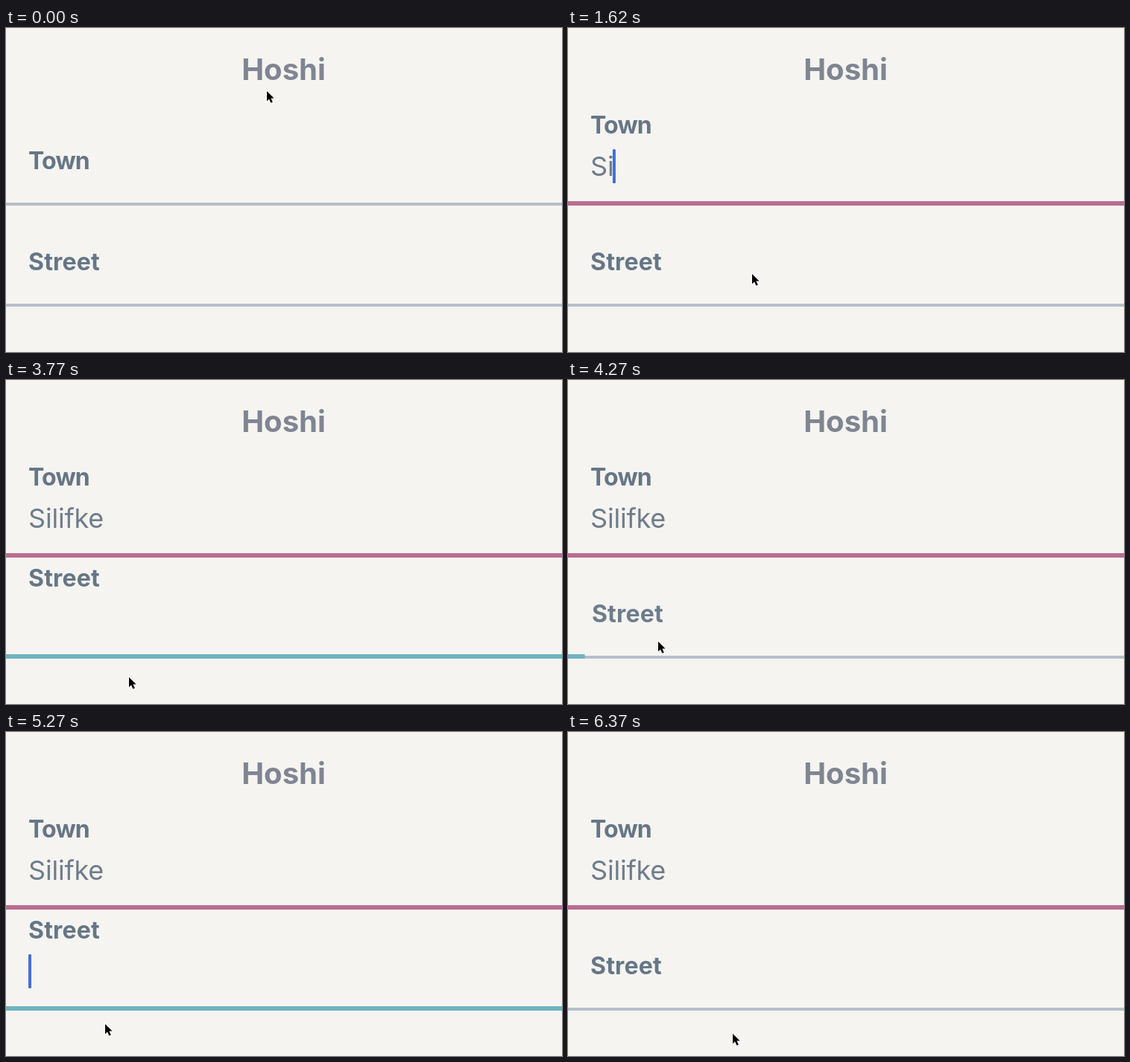
Animation, 746 px wide and 436 px high, one loop 6.47 s. Source, as an HTML page:

```html
<!DOCTYPE html>
<html lang="en">
<head>
<meta charset="utf-8">
<title>Hoshi text fields</title>
<style>
  html, body { margin: 0; width: 100%; height: 100%; overflow: hidden; background: #f5f4f0; }
  svg { display: block; width: 746px; height: 436px; font-family: Inter, "Liberation Sans", sans-serif; }
  .title { font-size: 40px; font-weight: 700; fill: #7f8592; text-anchor: middle; }
  .label { font-size: 32px; font-weight: 700; fill: #667686; }
  .value { font-size: 36px; letter-spacing: -.2px; fill: #6f7d8b; }
  .rule { fill: #b7bfc8; }
  .caret { fill: #3f70da; }
  #town .label { letter-spacing: -.8px; }
  #street .label { letter-spacing: .2px; }
</style>
</head>
<body>
<svg viewBox="0 0 746 436">
  <text class="title" x="372.5" y="70">Hoshi</text>
  <g id="town">
    <rect class="rule" y="235" width="746" height="4"/>
    <rect class="bar" y="233" height="6" fill="#b96e91"/>
    <text class="label">Town</text>
    <text class="value" x="30" y="199"></text>
    <rect class="caret" y="163" width="4" height="46" rx="1.5"/>
  </g>
  <g id="street">
    <rect class="rule" y="371" width="746" height="4"/>
    <rect class="bar" y="369" height="6" fill="#70b3c2"/>
    <text class="label">Street</text>
    <text class="value" x="30" y="335"></text>
    <rect class="caret" y="299" width="4" height="46" rx="1.5"/>
  </g>
  <path id="mouse" d="M0 0V13.4L3 10.6L5.4 15.8L7.8 14.7L5.5 9.6H9.6Z"
        stroke="#fff" stroke-width="1.8" paint-order="stroke"/>
</svg>
<script>
const LOOP = 6470, WIDTH = 746, INSET = 30, FADE = 200;
const WORD = 'Silifke', TYPE_START = 1490, KEY_GAP = 115;
const LAST_KEY = TYPE_START + KEY_GAP * (WORD.length - 1);

// The mouse sets off at `time` towards (x, y), tapping just before it leaves.
const MOVE = 260, TAP_LAG = 105;
const home = [350, 85];
const moves = [
  [160, 335, 180], [500, 247, 331], [2400, 114, 344], [3045, 165, 400],
  [3985, 121, 352], [4315, 133, 393], [5384, 125, 354], [5775, 221, 406]
];
const tapAt = ([time]) => time + TAP_LAG;
const townTap = tapAt(moves[1]);
// Street taps alternately focus and blur the field.
const streetTaps = [...moves.slice(3).map(tapAt), 6130];

const clamp = v => Math.min(1, Math.max(0, v));
const easeIn = v => v ** 1.69;
const easeInOut = v => v < .5 ? easeIn(2 * v) / 2 : 1 - easeIn(2 - 2 * v) / 2;
const ramp = (t, start) => easeInOut(clamp((t - start) / FADE));
const smooth = v => v * v * (3 - 2 * v);
const mix = (a, b, k) => a + (b - a) * k;
const blink = age => age % 1000 < 480 || age % 1000 > 800;

// The label fades out to the right, then back in from the left, higher up.
function field(id, low) {
  const find = name => document.querySelector(`#${id} .${name}`);
  const label = find('label'), bar = find('bar');
  const value = find('value'), caret = find('caret');
  return (p, text, caretOn) => {
    const raised = p > .5;
    label.setAttribute('x', INSET + 64 * (raised ? p - 1 : p));
    label.setAttribute('y', raised ? low - 48 : low);
    label.setAttribute('opacity', Math.abs(2 * p - 1));
    bar.setAttribute('width', WIDTH * p);
    if (value.textContent !== text) value.textContent = text;
    const length = text ? value.getComputedTextLength() - 1.5 : 0;
    caret.setAttribute('x', INSET + length);
    caret.setAttribute('visibility', caretOn ? 'visible' : 'hidden');
  };
}

const town = field('town', 190), street = field('street', 326);
const mouse = document.getElementById('mouse');

function draw(t) {
  const count = Math.max(0, Math.floor((t - TYPE_START) / KEY_GAP) + 1);
  const typing = t >= TYPE_START && t < LAST_KEY;
  const since = t < TYPE_START ? townTap : LAST_KEY;
  const townActive = t >= townTap && t < streetTaps[0];
  town(ramp(t, townTap), WORD.slice(0, count), townActive && (typing || blink(t - since)));

  const p = streetTaps.reduce((sum, tap, i) => sum + (i % 2 ? -1 : 1) * ramp(t, tap), 0);
  const done = streetTaps.filter(tap => tap <= t);
  street(clamp(p), '', done.length % 2 === 1 && blink(t - done[done.length - 1]));

  const [x, y] = moves.reduce(([px, py], [time, nx, ny]) => {
    const k = smooth(clamp((t - time) / MOVE));
    return [mix(px, nx, k), mix(py, ny, k)];
  }, home);
  mouse.setAttribute('transform', `translate(${x} ${y})`);
}

const start = performance.now();
function tick() {
  draw((performance.now() - start) % LOOP);
  requestAnimationFrame(tick);
}
tick();
</script>
</body>
</html>
```
